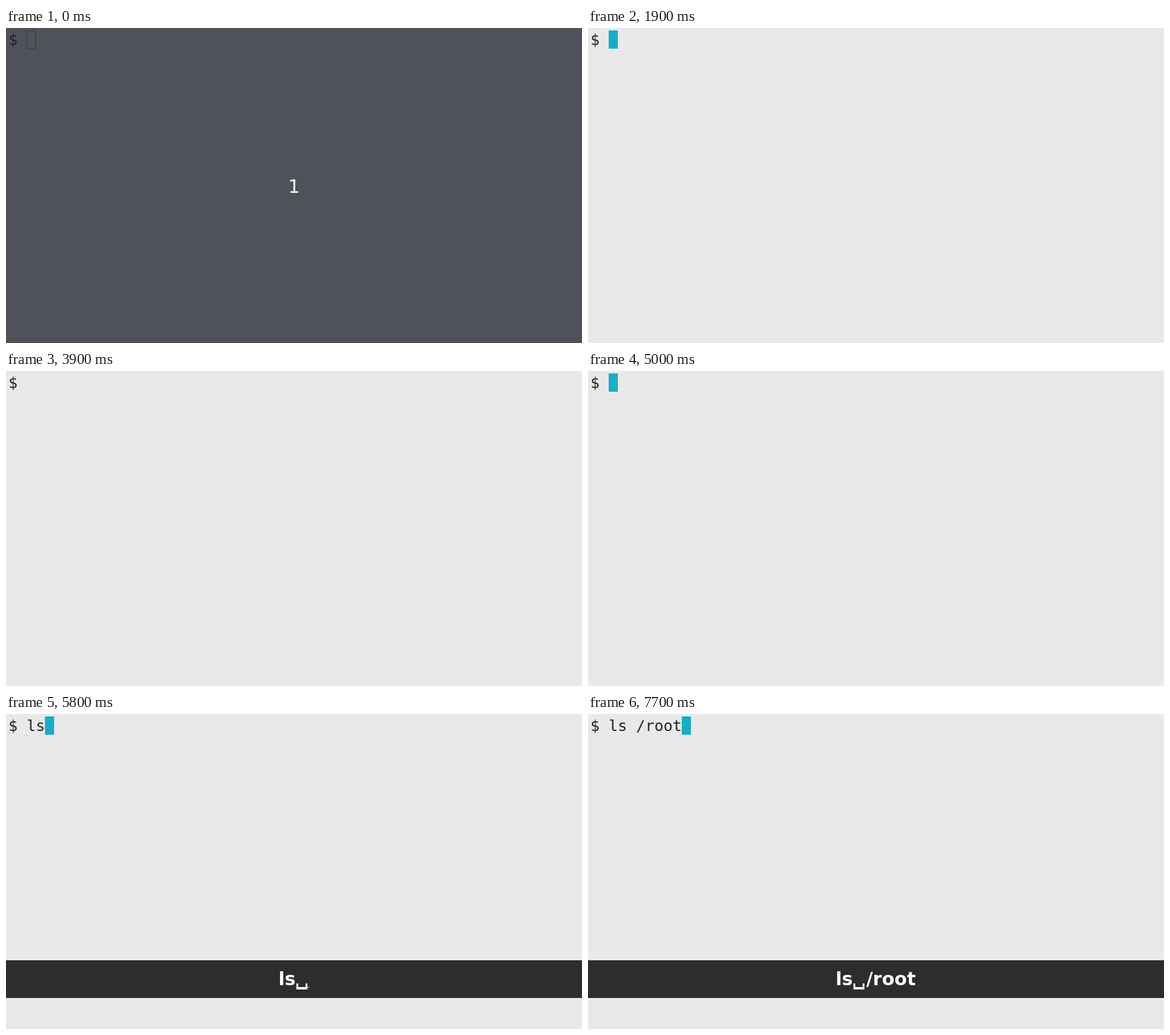
Recreate the animation shown at these times as an HTML page. Size 946 by 518 pixels, loop 8000 ms.

```html
<!DOCTYPE html>
<html lang="en">
<head>
<meta charset="utf-8">
<title>Terminal typing</title>
<style>
  html, body { margin: 0; width: 100%; height: 100%; overflow: hidden; background: #e9e9e9; }
  #stage { position: relative; width: 946px; height: 518px; overflow: hidden; }
  #stage > * { position: absolute; box-sizing: border-box; }
  #line {
    left: 4px; top: 4px; white-space: pre; color: #222;
    font: 25px/31px "DejaVu Sans Mono", monospace; letter-spacing: -0.05px;
  }
  #cursor { top: 4px; width: 15px; height: 30px; border: 1px solid #13aec8; }
  #cursor.solid { background: #13aec8; }
  #cursor.off { visibility: hidden; }
  #bar {
    left: 0; top: 405px; width: 946px; height: 62px; padding-right: 1px;
    background: #2d2d2d; color: #fff; text-align: center; white-space: pre;
    font: bold 30px/61px "DejaVu Sans", sans-serif;
  }
  #bar span { position: relative; }
  #bar .space { display: inline-block; width: 22px; height: 0; }
  #bar .space::before {
    content: ""; position: absolute; left: 1.5px; top: -3px; width: 17.5px; height: 10px;
    box-sizing: border-box; border: solid #fff; border-width: 0 3px 4px;
  }
  #bar .recent::after {
    content: ""; position: absolute; left: 0; right: 0; top: 34px; height: 2px; background: #fff;
  }
  #bar .space.recent::after { top: 3px; height: 1px; }
  #countdown {
    inset: 0; background: rgba(28, 32, 40, .75); color: #fff; text-align: center;
    font: 30px/521px "DejaVu Sans", sans-serif;
  }
</style>
</head>
<body>
<div id="stage">
  <div id="line"></div>
  <div id="cursor"></div>
  <div id="bar"></div>
  <div id="countdown">1</div>
</div>
<script>
const LOOP = 8000;
const COUNTDOWN_END = 400;
const CELL = 15;
const CURSOR_HOME = 34;

// [start ms, typed command, cursor style, keys in the bar, last key underlined]
const steps = [
  [0, "", "hollow", ""],
  [1900, "", "solid", ""],
  [2100, "", "hollow", ""],
  [3000, "", "solid", ""],
  [3900, "", "off", ""],
  [4000, "", "solid", ""],
  [4500, "", "off", ""],
  [5000, "", "solid", ""],
  [5300, "", "solid", "l", true],
  [5400, "l", "solid", "l", true],
  [5500, "l", "solid", "l"],
  [5700, "ls", "solid", "ls", true],
  [5800, "ls", "solid", "ls ", true],
  [6000, "ls /", "solid", "ls /", true],
  [6200, "ls /", "solid", "ls /"],
  [6400, "ls /r", "solid", "ls /r", true],
  [6500, "ls /ro", "solid", "ls /ro", true],
  [6600, "ls /roo", "solid", "ls /root", true],
  [6900, "ls /root", "solid", "ls /root"],
  [7200, "ls /root", "off", "ls /root"],
  [7700, "ls /root", "solid", "ls /root"]
];

const [line, cursor, bar, countdown] =
  ["line", "cursor", "bar", "countdown"].map(id => document.getElementById(id));
let shown = null;

function keySpan(key, recent) {
  const span = document.createElement("span");
  if (key === " ") span.classList.add("space");
  else span.textContent = key;
  span.classList.toggle("recent", recent);
  return span;
}

function show([, typed, style, keys, recent = false]) {
  line.textContent = "$ " + typed;
  cursor.className = style;
  cursor.style.left = CURSOR_HOME + CELL * typed.length + "px";
  bar.hidden = !keys;
  bar.replaceChildren(...[...keys].map((key, i) => keySpan(key, recent && i === keys.length - 1)));
}

function render(now) {
  const time = now % LOOP;
  const step = steps.findLast(([start]) => start <= time);
  countdown.hidden = time >= COUNTDOWN_END;
  if (step !== shown) show(shown = step);
}

const origin = performance.now();
function tick() {
  render(performance.now() - origin);
  requestAnimationFrame(tick);
}
tick();
</script>
</body>
</html>
```
